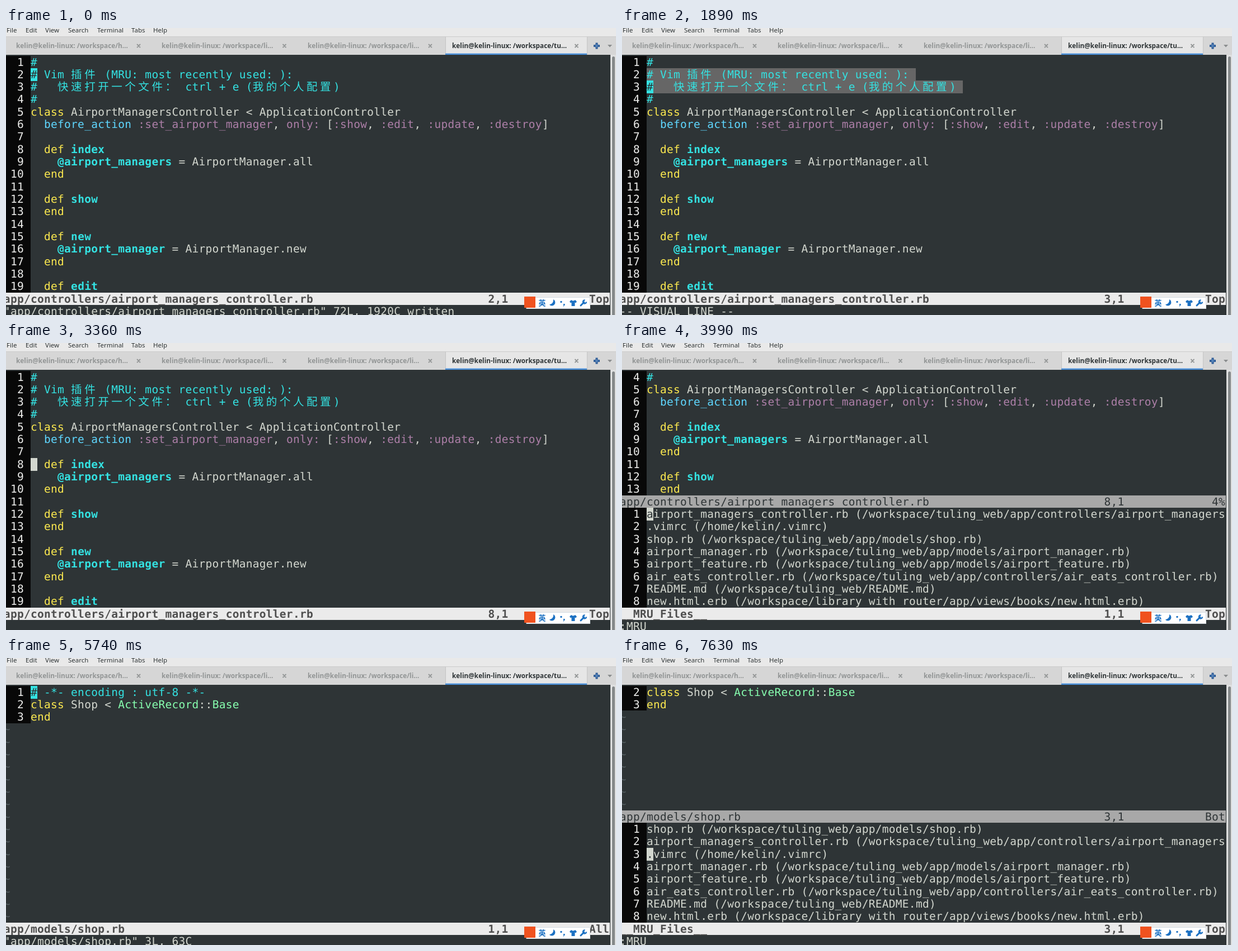
Animation, 1090 px wide and 514 px high, one loop 8 s. Source, as an HTML page:

```html
<!DOCTYPE html>
<html lang="en">
<head>
<meta charset="utf-8">
<title>Vim MRU</title>
<style>
html, body { margin: 0; width: 100%; height: 100%; overflow: hidden; background: #2e3436; }
#term, svg { position: absolute; left: 0; top: 0; width: 1090px; height: 514px; overflow: hidden; }
#term {
  --cell: 12.024px;
  background: #2e3436; color: #d3d7cf;
  font: 19.5px "DejaVu Sans Mono", "Noto Sans CJK SC", "Noto Sans CJK", monospace;
  text-rendering: geometricPrecision;
}
.row {
  position: absolute; left: 0; width: 1079px; height: 22.33px; line-height: 23px;
  white-space: pre; letter-spacing: calc(var(--cell) - 1ch);
}
.row > * { position: absolute; top: 0; }
.num { left: 0; width: 44px; height: 22.6px; background: #080808; color: #eeeeec; text-indent: -4.15px; }
.wide { letter-spacing: calc(2 * var(--cell) - 1em); }
.on { background: #ebebeb; color: #4e4e4e; font-weight: bold; }
.off { background: #a8a8a8; color: #2e3436; }
.vis { background: #666; }
.c { color: #34e2e2; }
.i { color: #34e2e2; font-weight: bold; }
.y { color: #fce94f; }
.b { color: #5fd7ff; }
.p { color: #ad7fa8; }
.g { color: #87ffaf; }
.n { color: #566064; }
.h { color: transparent; }
.cur { background: currentColor; -webkit-text-fill-color: #2e3436; }
svg text { font-family: "Noto Sans", "Open Sans", sans-serif; }
.menu { font-size: 11.5px; fill: #2e3436; }
.tab { font-size: 11.8px; font-weight: bold; fill: #929595; }
.tab.active { fill: #2e3436; }
</style>
</head>
<body>
<div id="term"></div>
<svg viewBox="0 0 1090 514">
  <rect width="1090" height="15" fill="#e9e9e9"/>
  <rect y="15" width="1090" height="33" fill="#d6d6d6"/>
  <path d="M0 15.5H1090" stroke="#cbcbcb"/>
  <rect x="785" y="16" width="253" height="32" fill="#e6e6e6"/>
  <path d="M785.5 16V48M1038.5 16V48" stroke="#c4c4c4"/>
  <rect x="785" y="45.5" width="253" height="2.5" fill="#4a90d9"/>
  <g class="menu">
    <text x="1" y="8">File</text><text x="35" y="8">Edit</text><text x="70" y="8">View</text>
    <text x="111" y="8">Search</text><text x="163" y="8">Terminal</text>
    <text x="224" y="8">Tabs</text><text x="263" y="8">Help</text>
  </g>
  <text class="tab" x="18" y="36">kelin@kelin-linux: /workspace/h…</text>
  <text class="tab" x="278" y="36">kelin@kelin-linux: /workspace/li…</text>
  <text class="tab" x="539" y="36">kelin@kelin-linux: /workspace/li…</text>
  <text class="tab active" x="797" y="36">kelin@kelin-linux: /workspace/tu…</text>
  <path d="M234 29l6 6m0-6l-6 6M494.5 29l6 6m0-6l-6 6M755 29l6 6m0-6l-6 6M1016.5 29l6 6m0-6l-6 6" stroke="#929595" stroke-width="1.8"/>
  <path d="M1050 32H1061M1055.5 26.5V37.5" stroke="#2c5a94" stroke-width="4"/>
  <path d="M1052 32H1059M1055.5 28.5V35.5" stroke="#6d9bd0"/>
  <path d="M1075 30h8l-4 4.5z" fill="#8a8d8e"/>
  <rect x="1080" y="48" width="10" height="466" fill="#dfe0e0"/>
  <rect x="1083" y="51" width="5" height="480" rx="2.5" fill="#85898a"/>

  <!-- input method bar -->
  <rect x="930" y="482.5" width="113.5" height="20" fill="#fff" stroke="#d4dbe2"/>
  <rect x="926" y="481" width="20" height="20" fill="#f0521f"/>
  <g fill="#1b70c2">
    <text x="951.5" y="497" style="font:bold 13px 'Noto Sans CJK SC','Noto Sans CJK',sans-serif">英</text>
    <path d="M978 486a6 6 0 1 1-7 9.5a8 8 0 0 0 7-9.5z"/>
    <circle cx="992" cy="490.5" r="1.7"/>
    <path d="M996 494h2.6v2l-2 2.5h-1l1-2.5h-.6z"/>
    <path d="M1010 487q3.5 3 7 0l3 3-2 2.5-1.5-1v6.5h-6v-6.5l-1.5 1-2-2.5z"/>
  </g>
  <path d="M1027 497l6-6" stroke="#1b70c2" stroke-width="3" stroke-linecap="round"/>
  <path d="M1034.5 487.5a3 3 0 1 0 2.5 3" fill="none" stroke="#1b70c2" stroke-width="2.4"/>
</svg>
<script>
const TOP = 49.5, ROW = 22.33, LEFT = -4.15, CELL = 12.024;

// {class:text} marks a coloured run
const code = `{c:#}
{c:# Vim 插件 (MRU: most recently used: ):}
{c:#   快速打开一个文件： ctrl + e (我的个人配置)}
{c:#}
{y:class} AirportManagersController < ApplicationController
  {b:before_action} {p::set_airport_manager}, {p:only:} [{p::show}, {p::edit}, {p::update}, {p::destroy}]

  {y:def} {i:index}
    {i:@airport_managers} = AirportManager.all
  {y:end}

  {y:def} {i:show}
  {y:end}

  {y:def} {i:new}
    {i:@airport_manager} = AirportManager.new
  {y:end}

  {y:def} {i:edit}`.split('\n');

const shop = `{c:# -*- encoding : utf-8 -*-}
{y:class} Shop < {g:ActiveRecord}::{g:Base}
{y:end}`.split('\n');

const recent = `airport_managers_controller.rb (/workspace/tuling_web/app/controllers/airport_managers
.vimrc (/home/kelin/.vimrc)
shop.rb (/workspace/tuling_web/app/models/shop.rb)
airport_manager.rb (/workspace/tuling_web/app/models/airport_manager.rb)
airport_feature.rb (/workspace/tuling_web/app/models/airport_feature.rb)
air_eats_controller.rb (/workspace/tuling_web/app/controllers/air_eats_controller.rb)
README.md (/workspace/tuling_web/README.md)
new.html.erb (/workspace/library{h:_}with{h:_}router/app/views/books/new.html.erb)`.split('\n');
const recentAfter = [recent[2], recent[0], recent[1], ...recent.slice(3)];

const codePath = 'app/controllers/airport_managers_controller.rb';
const shopPath = 'app/models/shop.rb';
const written = `"${codePath}" 72L, 1920C written`;
const opened = `"${shopPath}" 3L, 63C`;

function paint(line, cursor) {
  const runs = [...line.matchAll(/\{(\w):([^}]*)\}|[^{]+/g)].map(m => m[1] ? [m[1], m[2]] : ['', m[0]]);
  if (cursor) {
    const [cls, text] = runs.shift() || ['', ' '];
    runs.unshift([cls + ' cur', text[0]], [cls, text.slice(1)]);
  }
  return runs.map(([cls, text]) => {
    const html = text.replace(/</g, '&lt;').replace(/[\u3000-\uffef]+/g, '<span class="wide">$&</span>');
    return `<span class="${cls}">${html}</span>`;
  }).join('');
}

const at = (col, html, cls = '') => `<span class="${cls}" style="left:${LEFT + col * CELL}px">${html}</span>`;
const row = (y, html, cls = '') => `<div class="row ${cls}" style="top:${TOP + y * ROW}px">${html}</div>`;

function win(y, height, lines, first, cursor, selected = []) {
  let html = '';
  for (let i = 0; i < height; i++) {
    const n = first + i, line = lines[n - 1];
    if (line === undefined) { html += row(y + i, at(0, '~', 'n')); continue; }
    const vis = selected.includes(n);
    html += row(y + i, `<span class="num">${String(n).padStart(3)}</span>` +
      at(4, paint(line, n === cursor) + (vis ? ' ' : ''), vis ? 'vis' : ''));
  }
  return html;
}

function bar(y, name, pos, where, cls) {
  const label = cls === 'off' ? name.replace(/_/g, '{h:_}') : name;
  return row(y, at(0, paint(label)) + at(72, pos) + at(90 - where.length, where), cls);
}

const message = text => row(20, at(0, text));

// A negative cursor line keeps the ruler but hides the block
const full = (lines, path, where, cursor, text, selected) => {
  const n = Math.abs(cursor);
  return win(0, 19, lines, 1, cursor, selected) +
    bar(19, path, n + (lines[n - 1] ? ',1' : ',0-1'), where, 'on') + message(text);
};
const edit = (cursor, text = '', selected) => full(code, codePath, 'Top', cursor, text, selected);
const model = (cursor, text = opened) => full(shop, shopPath, 'All', cursor, text);

const list = (items, cursor, text) => win(11, 8, items, 1, cursor) +
  bar(19, '__MRU_Files__', Math.abs(cursor) + ',1', 'Top', 'on') + message(text);
const pick = (cursor, text = ':MRU') => win(0, 10, code, 4) +
  bar(10, codePath, '8,1', '4%', 'off') + list(recent, cursor, text);
const pickAgain = cursor => win(0, 10, shop, 2) +
  bar(10, shopPath, '3,1', 'Bot', 'off') + list(recentAfter, cursor, ':MRU');

const visual = '-- VISUAL LINE --';
const steps = [
  [0, edit(2, written)],
  [350, edit(-2, written)],
  [840, edit(2, written)],
  [980, edit(2, visual, [2])],
  [1890, edit(3, visual, [2, 3])],
  [2380, edit(3)],
  [2590, edit(4)],
  [2800, edit(5)],
  [3010, edit(6)],
  [3150, edit(7)],
  [3360, edit(8)],
  [3920, pick(1)],
  [4620, pick(2)],
  [4760, pick(3)],
  [5600, pick(-3, opened)],
  [5740, model(1)],
  [6020, model(2)],
  [6230, model(3)],
  [6720, model(-3, ':MRU')],
  [6790, pickAgain(1)],
  [7490, pickAgain(2)],
  [7630, pickAgain(3)],
];

const term = document.getElementById('term');
let shown;
function tick() {
  const t = performance.now() % 8000;
  const step = steps.findLast(s => s[0] <= t);
  if (step !== shown) term.innerHTML = (shown = step)[1];
  requestAnimationFrame(tick);
}
tick();
</script>
</body>
</html>
```
